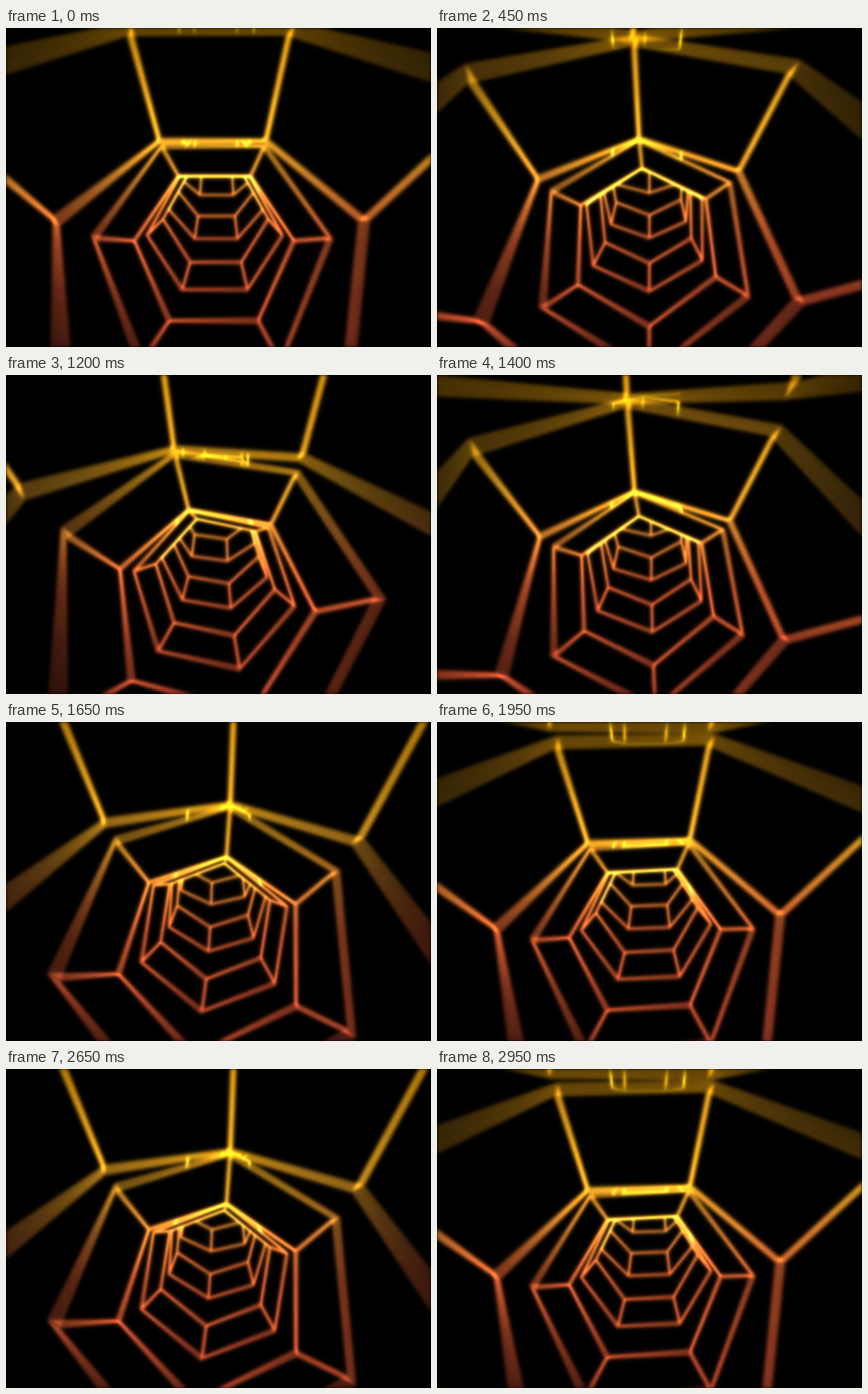
These frames come from a looping animation (480x360 px, 3 s). An HTML page with a canvas:

```html
<!DOCTYPE html>
<html lang="en">
<head>
<meta charset="utf-8">
<title>Hexagon tunnel</title>
<style>
  html, body { margin: 0; width: 100%; height: 100%; overflow: hidden; background: #000; }
  canvas { display: block; width: 480px; height: 360px; }
</style>
</head>
<body>
<canvas id="stage" width="480" height="360"></canvas>
<script>
const W = 480, H = 360, RAD = Math.PI / 180;
const LOOP = 3000, STEP = 50;

// A ring of hexagonal tubes; the camera sits inside it. Tube radius is 1.
const FOCAL = 220, NEAR = 0.1;
const RING = 3, HALF_LENGTH = 0.415, SPACING = 24;
const CENTER = { x: -0.055, y: -2.324, z: 2.913 };
const FIRST_ANGLE = -16.8, PASS_TIME = 500, SPIN = 0.06;
const SAMPLES = 12, SHUTTER = 0.75 * STEP;

function layer() {
  const c = document.createElement('canvas');
  c.width = W;
  c.height = H;
  return c.getContext('2d');
}

const stage = document.getElementById('stage').getContext('2d');
const scene = layer(), exposure = layer();

const tint = scene.createLinearGradient(0, 0, 0, H);
[[0, '#dc9608'], [0.36, '#eea41c'], [0.5, '#ee8a2a'], [0.66, '#e66030'], [1, '#cc4826']]
  .forEach(([at, color]) => tint.addColorStop(at, color));

function clear(ctx) {
  ctx.globalCompositeOperation = 'source-over';
  ctx.globalAlpha = 1;
  ctx.filter = 'none';
  ctx.fillStyle = '#000';
  ctx.fillRect(0, 0, W, H);
}

// Corner of a tube: angle along the ring, offset along the tube, angle around it.
function corner(theta, along, phi) {
  const s = Math.sin(theta), c = Math.cos(theta), r = RING + Math.cos(phi);
  return {
    x: CENTER.x + Math.sin(phi),
    y: CENTER.y + r * c - along * s,
    z: CENTER.z + r * s + along * c
  };
}

function clipNear(points) {
  const out = [];
  points.forEach((a, i) => {
    const b = points[(i + 1) % points.length];
    if (a.z >= NEAR) out.push(a);
    if ((a.z >= NEAR) !== (b.z >= NEAR)) {
      const k = (NEAR - a.z) / (b.z - a.z);
      out.push({ x: a.x + (b.x - a.x) * k, y: a.y + (b.y - a.y) * k, z: NEAR });
    }
  });
  return out;
}

const project = p => [W / 2 + FOCAL * p.x / p.z, H / 2 + FOCAL * p.y / p.z];

function area(poly) {
  return poly.reduce((sum, [x, y], i) => {
    const [nx, ny] = poly[(i + 1) % poly.length];
    return sum + x * ny - nx * y;
  }, 0);
}

function trace(path, poly) {
  poly.forEach(([x, y], i) => i ? path.lineTo(x, y) : path.moveTo(x, y));
  path.closePath();
}

function drawTube(theta, spin) {
  const inside = new Path2D(), outside = new Path2D();
  for (let j = 0; j < 6; j++) {
    const a = (j * 60 - 30) * RAD - spin, b = a + 60 * RAD;
    const face = clipNear([
      corner(theta, -HALF_LENGTH, a), corner(theta, -HALF_LENGTH, b),
      corner(theta, HALF_LENGTH, b), corner(theta, HALF_LENGTH, a)
    ]);
    if (face.length < 3) continue;
    const poly = face.map(project);
    trace(area(poly) < 0 ? inside : outside, poly);
  }
  const depth = Math.max(1, CENTER.z + RING * Math.sin(theta));
  scene.lineWidth = 1.3 + 3 / depth;
  for (const path of [inside, outside]) {
    scene.globalCompositeOperation = 'source-over';
    scene.fill(path);
    scene.globalCompositeOperation = 'lighter';
    scene.stroke(path);
  }
}

function drawScene(t) {
  clear(scene);
  scene.strokeStyle = tint;
  scene.lineJoin = 'round';
  const passed = t / PASS_TIME;
  const first = FIRST_ANGLE - SPACING * (passed - Math.floor(passed));
  for (let k = 10; k >= -2; k--) {
    drawTube((first + k * SPACING) * RAD, t * SPIN * RAD);
  }
}

function add(ctx, source, alpha, blur) {
  ctx.globalCompositeOperation = 'lighter';
  ctx.globalAlpha = alpha;
  ctx.filter = blur ? `blur(${blur}px)` : 'none';
  ctx.drawImage(source.canvas, 0, 0);
}

function render(t) {
  clear(exposure);
  for (let i = 0; i < SAMPLES; i++) {
    drawScene(t + ((i + 0.5) / SAMPLES - 0.5) * SHUTTER);
    add(exposure, scene, 1 / SAMPLES, 0);
  }
  clear(stage);
  add(stage, exposure, 0.9, 0.8);
  add(stage, exposure, 0.8, 2.8);
}

const start = performance.now();
let shown = -1;
function tick() {
  const step = Math.floor(((performance.now() - start) % LOOP) / STEP);
  if (step !== shown) {
    shown = step;
    render(step * STEP);
  }
  requestAnimationFrame(tick);
}
tick();
</script>
</body>
</html>
```
